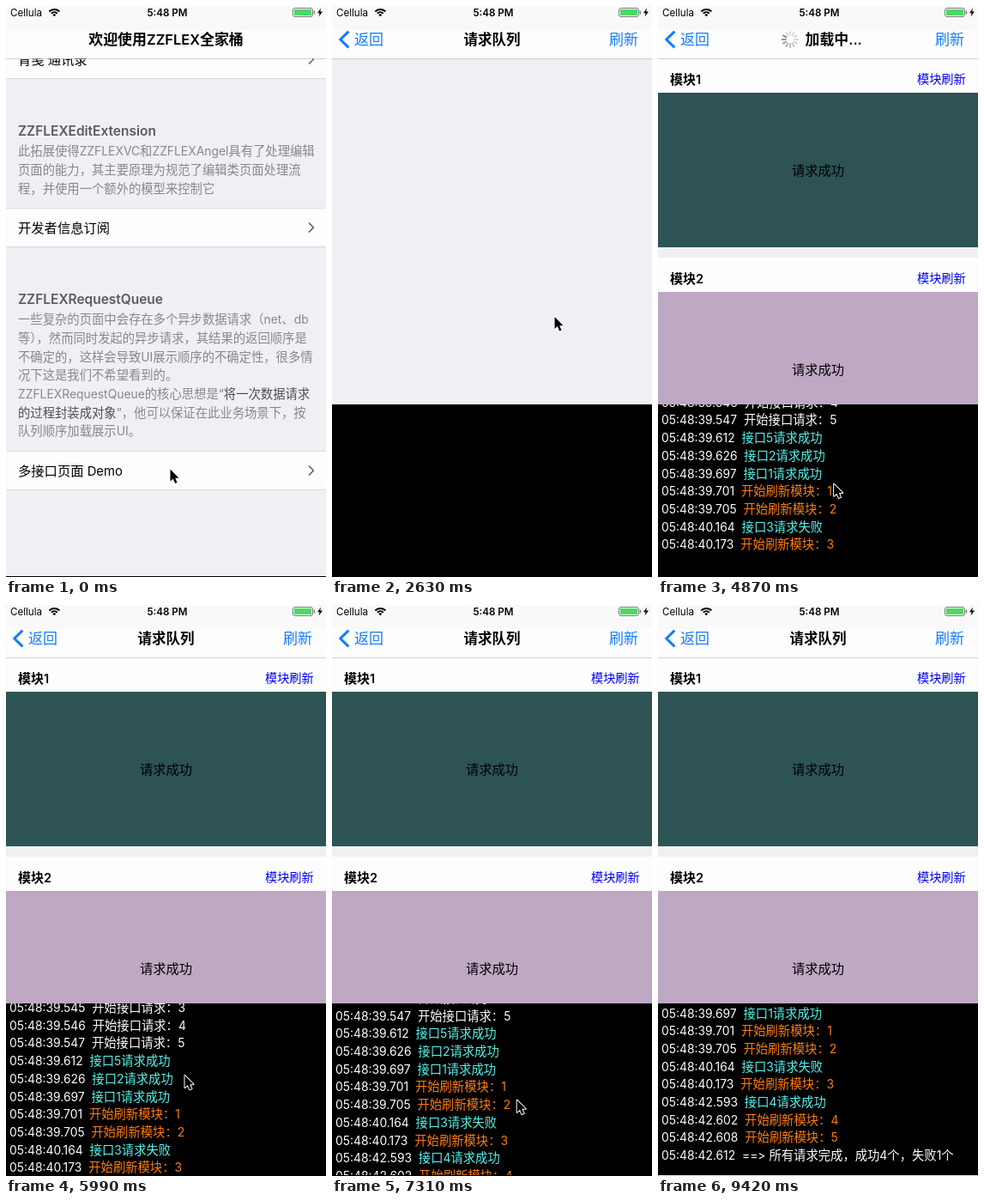
Write an HTML page with a canvas that moves like this. It is 373 px wide and 665 px high and loops after 9460 ms.

```html
<!DOCTYPE html>
<html lang="zh-CN">
<head>
<meta charset="utf-8">
<title>ZZFLEX</title>
<style>
html, body { margin: 0; width: 100%; height: 100%; overflow: hidden; background: #efeff4; }
canvas { display: block; width: 373px; height: 665px; }
</style>
</head>
<body>
<canvas id="stage"></canvas>
<script>
const W = 373, H = 665, LOOP = 9460;
const NAV = 61, CONSOLE = 464, ROW = 20.7;
const BLUE = '#147cff', BG = '#efeff4', INK = '#000';
const canvas = document.getElementById('stage');
const ctx = canvas.getContext('2d');
const dpr = window.devicePixelRatio || 1;
canvas.width = W * dpr;
canvas.height = H * dpr;

// [time, x, y] of the pointer tip
const POINTER = [
  [900, 191.5, 539.5], [1010, 186.5, 540.5], [1200, 186.5, 540.5], [1340, 183.5, 543],
  [1750, 183.5, 543], [2160, 184, 512], [2320, 184, 512], [2560, 275, 390],
  [2820, 190.5, 237], [3020, 190.5, 237], [3430, 190.5, 265], [3980, 190.5, 265],
  [4700, 216, 545], [4930, 203, 559], [5500, 203, 587], [5880, 203, 550],
  [5990, 208.5, 548], [6150, 209, 550], [6760, 206.5, 632], [6810, 206.5, 640],
  [6890, 206.5, 640], [7720, 224.5, 516], [7840, 227, 508], [7865, 227, 508],
  [8010, 232.8, 496.5], [8270, 232.8, 496.5], [9140, 338, 672]
];

// [time, y] of the twelfth log line
const SCROLL = [
  [3180, 702.7], [3420, 668.4], [3620, 668.4], [3920, 627], [4940, 627], [5500, 655],
  [6100, 655], [6700, 676.7], [6920, 676.7], [7720, 566], [7840, 558]
];

const WHITE = '#fff', CYAN = '#55f2ea', ORANGE = '#ff7d0e';
const LOG = [
  ['39.542', '开始接口请求：1', WHITE], ['39.543', '开始接口请求：2', WHITE],
  ['39.545', '开始接口请求：3', WHITE], ['39.546', '开始接口请求：4', WHITE],
  ['39.547', '开始接口请求：5', WHITE], ['39.612', '接口5请求成功', CYAN],
  ['39.626', '接口2请求成功', CYAN], ['39.697', '接口1请求成功', CYAN],
  ['39.701', '开始刷新模块：1', ORANGE], ['39.705', '开始刷新模块：2', ORANGE],
  ['40.164', '接口3请求失败', CYAN], ['40.173', '开始刷新模块：3', ORANGE],
  ['42.593', '接口4请求成功', CYAN], ['42.602', '开始刷新模块：4', ORANGE],
  ['42.608', '开始刷新模块：5', ORANGE], ['42.612', '==> 所有请求完成，成功4个，失败1个', WHITE]
];
const logTime = sec => 3030 + (sec - 39.547) * 945;
const LOADED = logTime(39.701), DONE = logTime(42.612);

const clamp = v => Math.min(1, Math.max(0, v));
const smooth = v => v * v * (3 - 2 * v);

function track(keys, t) {
  if (t <= keys[0][0]) return keys[0].slice(1);
  for (let i = 1; i < keys.length; i++) {
    const a = keys[i - 1], b = keys[i];
    if (t < b[0]) {
      const k = smooth((t - a[0]) / (b[0] - a[0]));
      return a.slice(1).map((v, j) => v + (b[j + 1] - v) * k);
    }
  }
  return keys[keys.length - 1].slice(1);
}

function rect(x, y, w, h, color) {
  ctx.fillStyle = color;
  ctx.fillRect(x, y, w, h);
}

function line(points, color, width) {
  ctx.strokeStyle = color;
  ctx.lineWidth = width;
  ctx.beginPath();
  points.forEach(([x, y]) => ctx.lineTo(x, y));
  ctx.stroke();
}

// Latin runs are set a little smaller than the Chinese ones; y is the middle of the line.
function text(str, x, y, size, color, weight = 400, align = 0) {
  const runs = str.match(/=|[ -<>-~“”]+|[^ -~“”]+/g).map(s => {
    const latin = /^[ -~“”]/.test(s);
    const font = `${weight} ${latin ? size * 0.968 : size}px ` +
      (latin ? 'Inter, Roboto, sans-serif' : '"Noto Sans CJK SC", "Noto Sans CJK", sans-serif');
    ctx.font = font;
    return { s, font, w: ctx.measureText(s).width };
  });
  x -= align * runs.reduce((sum, r) => sum + r.w, 0);
  ctx.fillStyle = color;
  for (const r of runs) {
    ctx.font = r.font;
    ctx.fillText(r.s, x, y + size * 0.37);
    x += r.w;
  }
  return x;
}

function cell(label, y, color = '#fdfdfd') {
  rect(0, y - 22, W, 44, color);
  rect(0, y - 22.5, W, 0.6, '#cfced3');
  rect(0, y + 22, W, 0.6, '#cfced3');
  text(label, 14, y, 15.3, INK);
  line([[353, y - 5.5], [358.5, y], [353, y + 5.5]], '#4a4a4d', 1.2);
}

function paragraph(lines, y) {
  lines.forEach((s, i) => text(s, 14, y + i * 21.65, 14.33, '#88878c'));
}

function homePage(pressed) {
  rect(0, NAV, W, H, BG);
  cell('青笺 通讯录', 62);
  text('ZZFLEXEditExtension', 14, 145, 16, '#5c5b60', 600);
  paragraph([
    '此拓展使得ZZFLEXVC和ZZFLEXAngel具有了处理编辑',
    '页面的能力，其主要原理为规范了编辑类页面处理流',
    '程，并使用一个额外的模型来控制它'
  ], 169);
  cell('开发者信息订阅', 258);
  text('ZZFLEXRequestQueue', 14, 341, 16, '#5c5b60', 600);
  paragraph([
    '一些复杂的页面中会存在多个异步数据请求（net、db',
    '等），然而同时发起的异步请求，其结果的返回顺序是',
    '不确定的，这样会导致UI展示顺序的不确定性，很多情',
    '况下这是我们不希望看到的。'
  ], 365);
  const gray = '#88878c', dark = '#4e4d52', size = 14.33;
  let x = text('ZZFLEXRequestQueue的核心思想是“', 14, 451.6, size, gray);
  text('将一次数据请求', x, 451.6, size, dark);
  x = text('的过程封装成对象', 14, 473.2, size, dark);
  text('”，他可以保证在此业务场景下，按', x, 473.2, size, gray);
  text('队列顺序加载展示UI。', 14, 494.9, size, gray);
  cell('多接口页面 Demo', 541, pressed ? '#d9d9d9' : undefined);
}

function moduleBlock(name, y, color) {
  rect(0, y, W, 40, '#fdfdfd');
  text(name, 14, y + 24, 15, INK, 600);
  text('模块刷新', 358.7, y + 23.5, 14.2, '#0000f5', 400, 1);
  rect(0, y + 40, W, 180, color);
  text('请求成功', 186.5, y + 130, 15.3, INK, 400, 0.5);
}

function queuePage(t) {
  rect(0, NAV, W, H, BG);
  if (t >= LOADED) {
    moduleBlock('模块1', 61, '#2d5354');
    moduleBlock('模块2', 293, '#bfa8c4');
  }
  rect(0, CONSOLE, W, H - CONSOLE, INK);
  ctx.save();
  ctx.beginPath();
  ctx.rect(0, CONSOLE, W, H - CONSOLE);
  ctx.clip();
  const [base] = track(SCROLL, t);
  LOG.forEach(([sec, msg, color], i) => {
    const y = base + (i - 11) * ROW;
    if (t < logTime(sec) || y < CONSOLE - 15 || y > H + 15) return;
    const x = text(`05:48:${sec}  `, 4, y, 14.33, WHITE);
    text(msg, x, y, 14.33, color);
  });
  ctx.restore();
}

function spinner(x, y, t) {
  const head = Math.floor(t / 83.33) % 12;
  ctx.lineCap = 'round';
  for (let i = 0; i < 12; i++) {
    const a = i * Math.PI / 6 - Math.PI / 2;
    const age = (head - i + 12) % 12;
    const c = Math.cos(a), s = Math.sin(a);
    const shade = Math.min(215, 135 + age * 12);
    line([[x + c * 5.3, y + s * 5.3], [x + c * 9.2, y + s * 9.2]],
      `rgb(${shade},${shade},${shade})`, 1.9);
  }
  ctx.lineCap = 'butt';
}

function statusBar() {
  text('Cellula', 5, 7.3, 12, INK);
  text('5:48 PM', 188, 7.3, 12, INK, 600, 0.5);
  ctx.strokeStyle = INK;
  ctx.lineWidth = 2;
  for (const r of [4.7, 8.1]) {
    ctx.beginPath();
    ctx.arc(56.3, 12, r, -Math.PI * 0.76, -Math.PI * 0.24);
    ctx.stroke();
  }
  ctx.fillStyle = INK;
  ctx.beginPath();
  ctx.moveTo(56.3, 12.3);
  ctx.arc(56.3, 12, 2.7, -Math.PI * 0.76, -Math.PI * 0.24);
  ctx.fill();

  ctx.strokeStyle = '#77797a';
  ctx.lineWidth = 1;
  ctx.beginPath();
  ctx.roundRect(334.5, 2.5, 23, 10, 2.5);
  ctx.stroke();
  rect(336, 4, 20, 7, '#4cd964');
  rect(358.7, 5.5, 1.4, 4, '#77797a');
  ctx.fillStyle = INK;
  ctx.beginPath();
  [[367, 2.5], [363, 8.3], [365.6, 8.3], [364.6, 12.5], [369, 6.5], [366.2, 6.5]]
    .forEach(([x, y]) => ctx.lineTo(x, y));
  ctx.fill();
}

function navBar(t, p) {
  rect(0, 0, W, NAV, '#fdfdfd');
  rect(0, 0, W, 28, '#f9f9f9');
  rect(0, NAV, W, 0.6, '#b4b4b6');
  statusBar();
  if (p < 1) {
    ctx.globalAlpha = clamp(1 - p * 1.6);
    text('欢迎使用ZZFLEX全家桶', 186.5 - 130 * p, 39, 16.95, INK, 600, 0.5);
  }
  if (p > 0) {
    ctx.globalAlpha = clamp(p * 1.3);
    line([[19.3, 29.6], [9.8, 39], [19.3, 48.4]], BLUE, 3);
    text('刷新', 357, 39, 17, BLUE, 400, 1);
    text('返回', 26 + 143 * (1 - p), 39, 17, BLUE);
    if (t >= 3030 && t < DONE) {
      spinner(154, 39, t);
      text('加载中...', 171.5, 39, 16.9, INK, 600);
    } else {
      text('请求队列', 186.5 + 187 * (1 - p), 39, 16.5, INK, 600, 0.5);
    }
  }
  ctx.globalAlpha = 1;
}

function pointer(x, y) {
  ctx.beginPath();
  [[0, 0], [0, 14], [3.2, 11], [5.6, 16.4], [8, 15.4], [5.7, 10.2], [10, 10.2]]
    .forEach(([dx, dy]) => ctx.lineTo(x + dx, y + dy));
  ctx.closePath();
  ctx.lineJoin = 'round';
  ctx.strokeStyle = WHITE;
  ctx.lineWidth = 2;
  ctx.stroke();
  ctx.fillStyle = INK;
  ctx.fill();
  ctx.lineJoin = 'miter';
}

// Progress of the page push: a critically damped spring, shown in 52 ms steps
function pushProgress(t) {
  if (t >= 2160) return 1;
  const step = 1638 + 52 * Math.floor((t - 1638) / 52);
  const wt = Math.max(0, step - 1672) * 0.018;
  return 1 - (1 + wt) * Math.exp(-wt);
}

function shifted(dx, draw) {
  ctx.save();
  ctx.translate(dx, 0);
  draw();
  ctx.restore();
}

function render(t) {
  ctx.setTransform(dpr, 0, 0, dpr, 0, 0);
  rect(0, 0, W, H, BG);
  const p = pushProgress(t);
  const left = Math.round(W * (1 - p));
  if (p < 1) {
    shifted(-Math.round(W * 0.3 * p), () => homePage(t >= 1640));
    if (p > 0) rect(0, NAV, left, H, `rgba(0,0,0,${0.1 * p})`);
  }
  if (p > 0) {
    if (p < 1) {
      const g = ctx.createLinearGradient(left - 9, 0, left, 0);
      g.addColorStop(0, 'rgba(0,0,0,0)');
      g.addColorStop(1, 'rgba(0,0,0,0.22)');
      rect(left - 9, NAV, 9, H, g);
    }
    shifted(left, () => queuePage(t));
  }
  navBar(t, p);
  if (t < 9140) pointer(...track(POINTER, t));
  rect(0, 664, W, 1, t < 9420 ? '#000' : '#e4e4e6');
}

const start = performance.now();
function tick() {
  render((performance.now() - start) % LOOP);
  requestAnimationFrame(tick);
}
tick();
</script>
</body>
</html>
```
